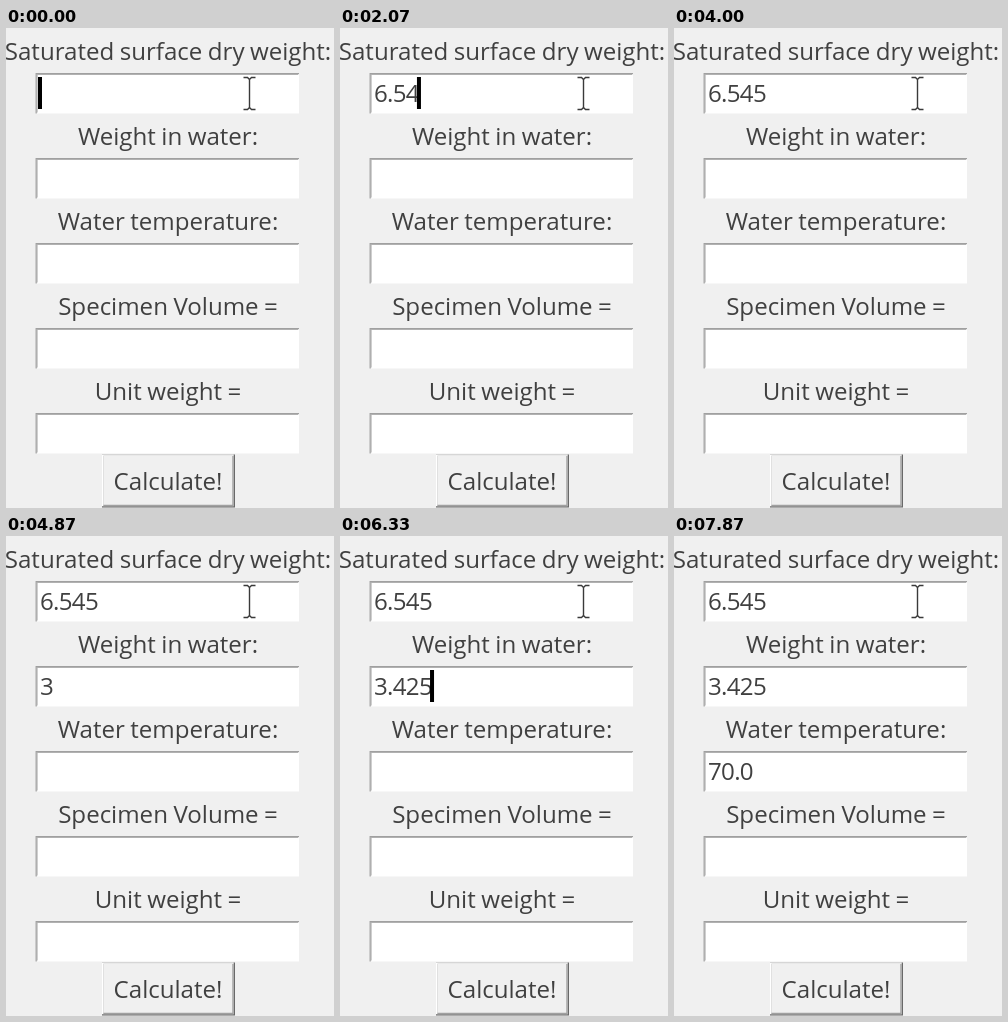
Animation of 328 by 480 pixels, one loop 8 s. Source, as an HTML page:

```html
<!DOCTYPE html>
<html lang="en">
<head>
<meta charset="utf-8">
<style>
html, body { margin: 0; width: 100%; height: 100%; overflow: hidden; background: #f0f0f0; }
svg { display: block; width: 328px; height: 480px; }
text { font: 24.1px "Open Sans", "Noto Sans", sans-serif; fill: #404040; white-space: pre; }
text, path { filter: blur(.45px); }
.label { text-anchor: middle; word-spacing: -.8px; }
.value { letter-spacing: -.7px; }
</style>
</head>
<body>
<svg id="stage" viewBox="0 0 328 480">
  <rect width="328" height="480" fill="#f0f0f0"/>
</svg>
<script>
const LOOP = 8000, STEP = 85, TEXT_X = 34;
const svg = document.getElementById("stage");

function add(tag, attrs, content) {
  const el = document.createElementNS("http://www.w3.org/2000/svg", tag);
  for (const key in attrs) el.setAttribute(key, attrs[key]);
  if (content) el.textContent = content;
  return svg.appendChild(el);
}
const path = (d, fill) => add("path", { d, fill });

const labels = [
  "Saturated surface dry weight:",
  "Weight in water:",
  "Water temperature:",
  "Specimen Volume =",
  "Unit weight ="
];

// Sunken entry fields under their labels
const values = labels.map((name, i) => {
  const y = i * STEP;
  add("text", { class: "label", x: 162, y: y + 31.5 }, name);
  add("rect", { x: 29.5, y: y + 45, width: 263.5, height: 40.5, fill: "#fff" });
  path(`M29.5 ${y + 45}H293v1.3H30.8V${y + 85.5}H29.5z`, "#a0a0a0");
  path(`M30.8 ${y + 46.3}H292v.7H31.5V${y + 84.5}H30.8z`, "#a0a0a0");
  return add("text", { class: "value", x: TEXT_X, y: y + 74 });
});

// Raised button
path("M96 426.5H229V479.5H96z", "#696969");
path("M96 426.5H227.7V478.2H96z", "#fff");
path("M97.3 427.8H227.7V478.2H97.3z", "#a0a0a0");
path("M97.3 427.8H226.3V476.8H97.3z", "#f0f0f0");
add("text", { class: "label", x: 162, y: 461.5 }, "Calculate!");

const caret = add("rect", { width: 4, height: 32, fill: "#000" });

// Text pointer
add("path", {
  d: "M237.5 49.5H241.5L243.5 51.5L245.5 49.5H249.5M243.5 51.5V79.5M237.5 81.5H241.5L243.5 79.5L245.5 81.5H249.5",
  fill: "none", stroke: "#3a3a3a", "stroke-width": 1.4
});

// Each field: text typed, key times, and caret on/off times
const fields = [
  { text: "6.545", keys: [1400, 1930, 2000, 2070, 2330],
    blink: [0, 530, 870, 1470, 1800, 2400, 2730, 3330] },
  { text: "3.425", keys: [4600, 5130, 5400, 5600, 5730],
    blink: [3330, 4000, 4270, 4870, 5200, 5800, 6130, 6400] },
  { text: "70.0", keys: [6870, 7400, 7670, 7730],
    blink: [6400, 6970, 7270, 7870] }
];
const passed = (times, t) => times.filter(time => time <= t).length;

function render(t) {
  let shown = false;
  fields.forEach(({ text, keys, blink }, i) => {
    const typed = text.slice(0, passed(keys, t));
    if (values[i].textContent !== typed) values[i].textContent = typed;
    if (passed(blink, t) % 2) {
      shown = true;
      const width = typed ? values[i].getComputedTextLength() : 0;
      caret.setAttribute("x", typed ? TEXT_X + width - 2 : 32);
      caret.setAttribute("y", i * STEP + 49);
    }
  });
  caret.setAttribute("visibility", shown ? "visible" : "hidden");
}

const start = performance.now();
function frame() {
  render((performance.now() - start) % LOOP);
  requestAnimationFrame(frame);
}
render(0);
frame();
</script>
</body>
</html>
```
